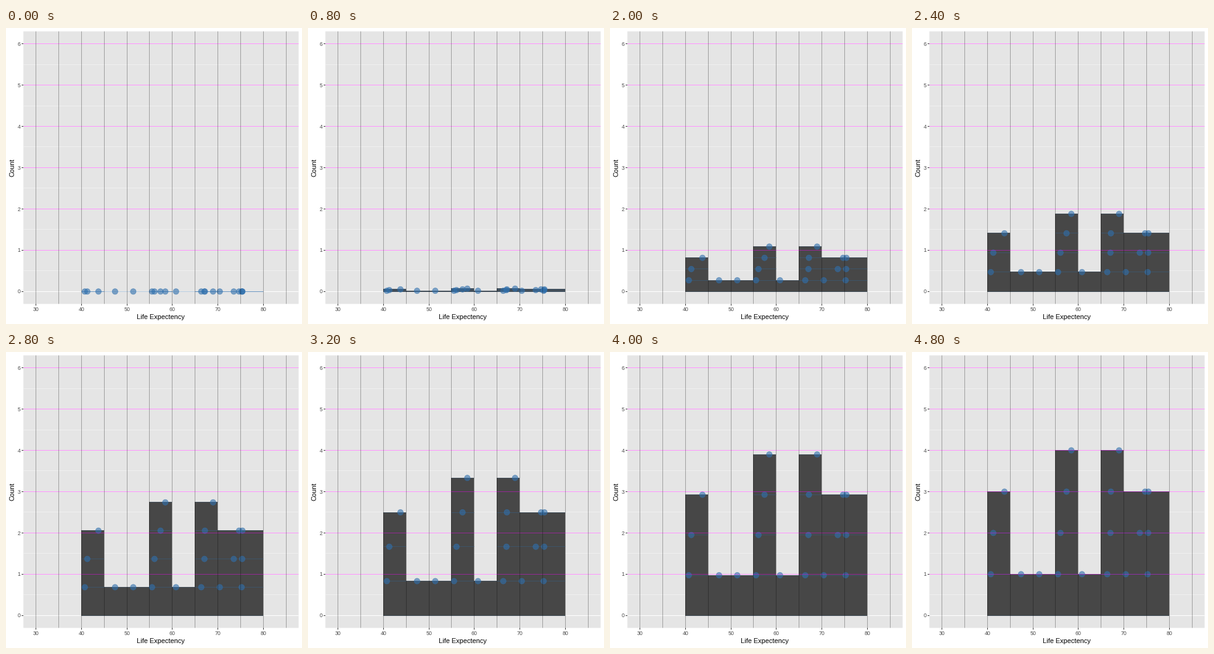
Write a matplotlib script that moves like this. It is 480 px wide and 480 px high and loops after 10 s.

```python
from math import floor

import matplotlib.pyplot as plt
from matplotlib.animation import FuncAnimation
from matplotlib.collections import LineCollection
from matplotlib.patches import Circle, Rectangle

SIZE = 480
LEFT, RIGHT, TOP, BOTTOM = 28.2, 474.5, 5.5, 447.4
STEPS = 49  # frames the growth takes, at 100 ms each

# Values in each five-year bin, from the bottom of the stack upwards
BINS = {
    40: [40.75, 41.3, 43.75],
    45: [47.4],
    50: [51.4],
    55: [55.53, 56.07, 57.4, 58.45],
    60: [60.8],
    65: [66.35, 67.05, 67.15, 68.95],
    70: [70.42, 73.5, 74.67],
    75: [75.23, 75.35, 75.4],
}

plt.rcParams["font.family"] = "Liberation Sans"
fig = plt.figure(figsize=(SIZE / 72, SIZE / 72), dpi=72, facecolor="white")
ax = fig.add_axes([0, 0, 1, 1])
ax.set_xlim(0, SIZE)
ax.set_ylim(SIZE, 0)
ax.axis("off")


def px(value):
    return LEFT + (value - 27.25) * (RIGHT - LEFT) / 60.5


def py(count):
    return BOTTOM - (count + 0.3) * (BOTTOM - TOP) / 6.6


def crisp(v):
    """Centre of the pixel that holds v."""
    return floor(v) + 0.5


def line(xs, ys, color, alpha=1.0, z=1):
    ax.plot(xs, ys, color=color, lw=1, alpha=alpha, zorder=z,
            solid_capstyle="butt", snap=False)


def hline(count, color, **style):
    line([LEFT, RIGHT], [crisp(py(count))] * 2, color, **style)


def vline(value, color, **style):
    line([crisp(px(value))] * 2, [TOP, BOTTOM], color, **style)


def ease(t):
    """Cubic in and out."""
    return 4 * t ** 3 if t < 0.5 else 1 - 4 * (1 - t) ** 3


# Panel and grid
ax.add_patch(Rectangle((LEFT, TOP), RIGHT - LEFT, BOTTOM - TOP,
                       fc="#e5e5e5", lw=0, zorder=0, snap=False))
for c in range(6):
    hline(c + 0.5, "#efefef")
hline(0, "white")
for c in range(1, 7):
    hline(c, "white")
    hline(c, "magenta", alpha=0.42, z=5)
for v in range(30, 86, 5):
    vline(v, "black", alpha=0.3, z=5)

# Axes
LABEL = dict(fontsize=8.8, color="#4d4d4d", va="baseline")
for v in range(30, 81, 10):
    line([crisp(px(v))] * 2, [BOTTOM, BOTTOM + 2.75], "#333333")
    ax.text(px(v), 459, str(v), ha="center", **LABEL)
for c in range(7):
    line([LEFT - 2.75, LEFT], [crisp(py(c))] * 2, "#333333")
    ax.text(LEFT - 5, py(c) + 3.1, str(c), ha="right", **LABEL)
ax.text((LEFT + RIGHT) / 2, 472, "Life Expectency", fontsize=11,
        ha="center", va="baseline")
ax.text(15.6, (TOP + BOTTOM) / 2, "Count", fontsize=11, rotation=90,
        ha="right", va="center")

# Columns, unit borders and points
BLUE = (0.19, 0.44, 0.68)
BASE = floor(py(0)) + 1
bars, dots = [], []
for start, values in BINS.items():
    x0, x1 = floor(px(start)), floor(px(start + 5))
    bar = Rectangle((x0, BASE), x1 - x0, 0, fc="#474747", lw=0, zorder=2,
                    snap=False)
    bars.append((ax.add_patch(bar), len(values)))
    for level, value in enumerate(values, 1):
        dot = Circle((px(value), py(0)), 4.62, fc=(*BLUE, 0.6),
                     ec=(*BLUE, 0.6), lw=0.71, zorder=4)
        dots.append((ax.add_patch(dot), px(value), level))

borders = LineCollection([], colors=[(*BLUE, 0.18)], linewidths=1, zorder=3,
                         snap=False)
ax.add_collection(borders, autolim=False)


def draw(frame):
    unit = ease(min(frame / STEPS, 1))
    for bar, count in bars:
        bar.set_height(floor(py(count * unit)) - BASE if unit else 0)
    for dot, x, level in dots:
        dot.center = x, py(level * unit)
    # Each stacked unit has a lower and an upper border
    borders.set_segments([
        [(px(start), crisp(py(k * unit))), (px(start + 5), crisp(py(k * unit)))]
        for start, values in BINS.items()
        for low in range(len(values)) for k in (low, low + 1)
    ])
    return []


anim = FuncAnimation(fig, draw, frames=100, interval=100, repeat=True,
                     repeat_delay=0, init_func=lambda: draw(0), blit=False)
plt.show()
```
